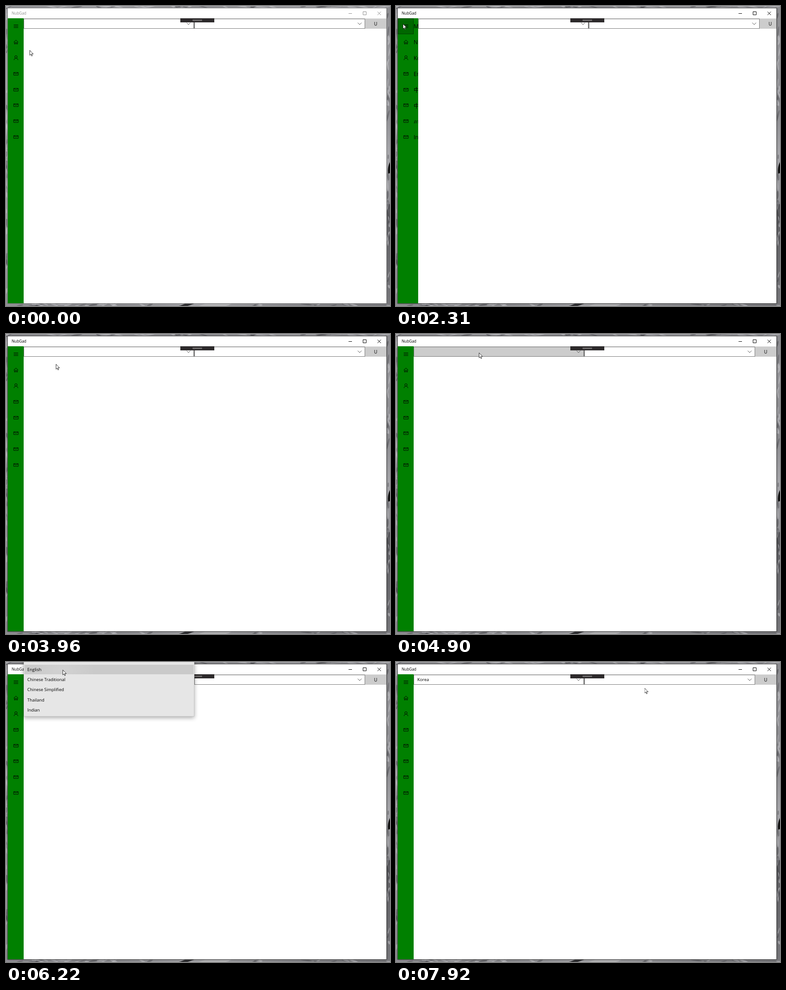
Animation, 848 px wide and 660 px high, one loop 8 s. Source, as an HTML page with a canvas:

```html
<!DOCTYPE html>
<html lang="en">
<head>
<meta charset="utf-8">
<title>NubGad</title>
<style>
@property --x { syntax: "<length>"; inherits: true; initial-value: 39px; }
@property --w { syntax: "<length>"; inherits: true; initial-value: 801px; }
html, body { margin: 0; width: 100%; height: 100%; overflow: hidden; background: #8c8c90; }
body { position: relative; font: 9.45px/22px "Open Sans", "Noto Sans", sans-serif; color: #000; }
body * { box-sizing: border-box; }
canvas, #win, #win > *, #popup, #cursor, .hl, .hov { position: absolute; }
canvas { left: 0; top: 0; }
svg { display: block; fill: none; stroke: currentColor; }
#win, #win *, #popup, .hl, #cursor { animation: 8s step-end infinite; }

#win { left: 0; top: 0; width: 848px; height: 660px; animation-name: pane; }
#frame { left: 3px; top: 4px; width: 838px; height: 651px; background: #fff; border: 1px solid #555; animation-name: shade !important; }
#bar { left: 4px; top: 5px; width: 836px; height: 22px; font-size: 8.4px; animation-name: active !important; }
#bar span { position: absolute; left: 8.5px; }
#bar svg { position: absolute; left: 750px; top: 4px; }

#side { left: 4px; top: 27px; width: calc(var(--x) - 4px); height: 627px; background: #008000; overflow: hidden; }
.hov { left: 0; top: 0; width: 35px; height: 35px; border: 1px solid #0006; animation-name: hover !important; }
.row { position: relative; height: 34.8px; font-size: 12.1px; line-height: 34.8px; white-space: nowrap; }
.row svg { position: absolute; left: 11.5px; top: 11.4px; width: 12px; height: 12px; stroke-width: .9; }
.row span { position: absolute; left: 35px; top: 1.2px; }
.cjk { font-size: 12.65px; }
[lang=zh-Hant] { font-family: "Open Sans", "Noto Sans CJK TC", sans-serif; }
[lang=zh-Hans] { font-family: "Open Sans", "Noto Sans CJK SC", sans-serif; }

#clip { left: 0; top: 27px; width: 840px; height: 23px; overflow: hidden; }
#page { position: absolute; left: var(--x); top: 1px; width: var(--w); height: 21px; display: grid; grid-template-columns: 8fr 8fr 1fr; animation-name: fade !important; }
.combo { position: relative; min-width: 0; border: 1px solid #7a7a7a; box-shadow: 0 1px #7a7a7a66, 0 -1px #7a7a7a55; line-height: 20px; padding-left: 7px; }
.combo svg { position: absolute; right: 6px; top: 7px; width: 10px; height: 6px; color: #555; }
#first { border-right-width: 2px; animation-name: press; }
#first span { animation-name: picked; }
#go { min-width: 0; background: #ccc; box-shadow: 0 -1px #ccc8, 0 1px #ccc8; text-align: center; line-height: 22px; font-size: 10px; }
#grip { left: 384.5px; top: 27px; width: 75.5px; height: 9px; background: #2d2a2b; }
#grip::after { content: ""; position: absolute; left: 27.5px; top: 3px; width: 21px; height: 3px; background: #6e6b6c; }

#popup { left: 39px; top: -23px; width: 377px; height: 143px; padding: 5.5px 0 0 7px; background: #e6e6e6; border: 1px solid #c6c6c6; box-shadow: 0 3px 9px #0005; animation-name: drop; }
#popup p { position: relative; margin: 0; height: 22.3px; line-height: 22.3px; }
.hl { left: 1px; width: 373px; height: 21.6px; background: radial-gradient(ellipse 70px 30px at 85px 12px, #d2d2d2, #cacaca); animation-name: pick; }
#cursor { left: 0; top: 0; width: 9px; height: 14px; fill: #fff; stroke: #000; stroke-width: .8; animation-name: move; }

@keyframes active { 0% { color: #8e8e8e; } 7.75% { color: #000; } }
@keyframes shade {
  0% { box-shadow: 0 0 2px #0003; border-color: #777; }
  7.75% { box-shadow: 0 0 4px #0006; border-color: #444; }
}
@keyframes pane {
  0% { --x: 39px; --w: 801px; }
  8.75% { --x: 84px; --w: 732px; }
  9.75% { --x: 102px; --w: 732px; }
  10.625% { --x: 106px; --w: 732px; }
  11.625% { --x: 108px; --w: 732px; }
  26.875% { --x: 96px; --w: 801px; }
  27.875% { --x: 66px; --w: 801px; }
  28.875% { --x: 49px; --w: 801px; }
  30.125% { --x: 42px; --w: 801px; }
  31% { --x: 40px; --w: 801px; }
  32%, 100% { --x: 39px; --w: 801px; }
}
@keyframes hover {
  0% { visibility: hidden; top: 0; background: #0002; }
  2.875% { visibility: visible; top: 0; background: #0002; }
  7.75% { visibility: visible; top: 0; background: #0003; }
  13.5% { visibility: visible; top: 0; background: #0002; }
  26% { visibility: visible; top: 0; background: #0003; }
  32.875% { visibility: visible; top: 0; background: #0002; }
  36.75% { visibility: visible; top: 35px; background: #0002; }
  41.625% { visibility: visible; top: 35px; background: #0003; }
  45.625% { visibility: visible; top: 35px; background: #0002; }
  46.6%, 100% { visibility: hidden; top: 35px; background: #0002; }
}
@keyframes fade {
  0% { opacity: 1; }
  43.625% { opacity: .4; }
  44.625% { opacity: .84; }
  45.625% { opacity: .95; }
  46.6%, 100% { opacity: 1; }
}
@keyframes press {
  0% { background: #fff; border-color: #7a7a7a; }
  49.6% { background: #fff; border-color: #666; }
  59.375% { background: #ccc; border-color: #7a7a7a; }
  86.375%, 100% { background: #fff; border-color: #7a7a7a; }
}
@keyframes picked { 0% { visibility: hidden; } 86.375%, 100% { visibility: visible; } }
@keyframes drop {
  0% { visibility: hidden; opacity: 1; clip-path: inset(50px -20px 71px); }
  62.375% { visibility: visible; opacity: 1; clip-path: inset(34px -20px 46px); }
  63.4% { visibility: visible; opacity: 1; clip-path: inset(12px -20px 15px); }
  64.4% { visibility: visible; opacity: 1; clip-path: inset(2px -20px 3px); }
  65.4% { visibility: visible; opacity: 1; clip-path: inset(-20px); }
  86.375% { visibility: visible; opacity: .5; clip-path: inset(-20px); }
  87.5%, 100% { visibility: hidden; opacity: 1; clip-path: inset(-20px); }
}
@keyframes pick {
  0% { top: 50.1px; }
  67.4% { top: 27.8px; }
  79.75%, 100% { top: 5.5px; }
}
@keyframes move {
  0% { transform: translate(52px, 97px); }
  .75% { transform: translate(0, 30px); }
  2.875% { transform: translate(6px, 32px); }
  3.875% { transform: translate(11px, 36px); }
  4.875% { transform: translate(14px, 38px); }
  5.875% { transform: translate(15px, 39px); }
  35.75% { transform: translate(21px, 58px); }
  36.75% { transform: translate(26px, 79px); }
  45.625% { transform: translate(31px, 84px); }
  46.6% { transform: translate(46px, 89px); }
  47.6% { transform: translate(76px, 80px); }
  48.6% { transform: translate(110px, 66px); }
  49.6% { transform: translate(138px, 55px); }
  50.5% { transform: translate(153px, 50px); }
  51.5% { transform: translate(160px, 48px); }
  55.375% { transform: translate(170px, 46px); }
  56.25% { transform: translate(180px, 43px); }
  57.25% { transform: translate(183px, 41px); }
  66.4% { transform: translate(172px, 36px); }
  67.4% { transform: translate(148px, 26px); }
  68.4% { transform: translate(130px, 22px); }
  69.125% { transform: translate(125px, 20px); }
  71.125% { transform: translate(125px, 17px); }
  78.75% { transform: translate(122px, 9px); }
  79.75% { transform: translate(118px, 0); }
  80.625% { transform: translate(113px, -8px); }
  89.375% { transform: translate(150px, 20px); }
  90.375% { transform: translate(236px, 78px); }
  91.25% { transform: translate(312px, 118px); }
  92.25% { transform: translate(341px, 131px); }
  95.125% { transform: translate(372px, 124px); }
  96.125% { transform: translate(440px, 103px); }
  97.125% { transform: translate(505px, 78px); }
  98% { transform: translate(538px, 64px); }
  99%, 100% { transform: translate(548.5px, 57px); }
}
</style>
</head>
<body>
<svg width="0" height="0" style="position:absolute">
  <symbol id="bars" viewBox="0 0 12 12"><path d="M1 3.5h10M1 6.5h10M1 9.5h10"/></symbol>
  <symbol id="home" viewBox="0 0 12 12"><path d="M1.2 6.4 6 1.9l4.8 4.5M2.6 5.4v5.1h2.3V7.2h2.2v3.3h2.3V5.4"/></symbol>
  <symbol id="user" viewBox="0 0 12 12"><circle cx="6" cy="4" r="2.7"/><path d="M1.7 11c.3-2.8 2-4.3 4.3-4.3s4 1.5 4.3 4.3"/></symbol>
  <symbol id="mail" viewBox="0 0 12 12"><path d="M1 3.2h10v6H1zM1 3.5l5 2.8 5-2.8"/></symbol>
  <symbol id="down" viewBox="0 0 10 6"><path d="M.7.7 5 5 9.3.7"/></symbol>
</svg>
<canvas id="wall" width="848" height="660"></canvas>

<div id="win">
  <div id="frame"></div>
  <div id="bar">
    <span>NubGad</span>
    <svg width="80" height="14"><path d="M2.5 7.5h7.5M34.5 3.5h7v7h-7zM66.5 3.5l7.5 7.5M74 3.5 66.5 11"/></svg>
  </div>
  <div id="clip">
    <div id="page">
      <div class="combo" id="first"><span>Korea</span><svg><use href="#down"/></svg></div>
      <div class="combo"><svg><use href="#down"/></svg></div>
      <div id="go">U</div>
    </div>
  </div>
  <div id="side">
    <div class="hov"></div>
    <div class="row"><svg><use href="#bars"/></svg><span>Menu</span></div>
    <div class="row"><svg><use href="#home"/></svg><span>NubGad</span></div>
    <div class="row"><svg><use href="#user"/></svg><span>Korean</span></div>
    <div class="row"><svg><use href="#mail"/></svg><span>English</span></div>
    <div class="row"><svg><use href="#mail"/></svg><span class="cjk" lang="zh-Hant">中文 (繁體)</span></div>
    <div class="row"><svg><use href="#mail"/></svg><span class="cjk" lang="zh-Hans">中文 (简体)</span></div>
    <div class="row"><svg><use href="#mail"/></svg><span lang="th">ภาษาไทย</span></div>
    <div class="row"><svg><use href="#mail"/></svg><span>Indonesia</span></div>
  </div>
  <div id="grip"></div>
</div>

<div id="popup">
  <div class="hl"></div>
  <p>Korea</p>
  <p>English</p>
  <p>Chinese Traditional</p>
  <p>Chinese Simplified</p>
  <p>Thailand</p>
  <p>Indian</p>
</div>
<svg id="cursor" viewBox="0 0 9 14"><path d="M.5.5v10.9l2.5-2.3 1.7 4 1.6-.7-1.7-3.9h3.6z"/></svg>

<script>
// Soft grey wallpaper that shows around the window
const g = document.getElementById('wall').getContext('2d');
let seed = 11;
const rnd = () => (seed = seed * 16807 % 2147483647) / 2147483647;

function blob(x, y, rx, ry, color) {
  g.fillStyle = color;
  g.beginPath();
  g.ellipse(x, y, rx, ry, rnd() - .5, 0, 7);
  g.fill();
}

function strip(x, y, w, h, stops) {
  const fill = g.createLinearGradient(x, y, w > h ? x + w : x, w > h ? y : y + h);
  stops.forEach((c, i) => fill.addColorStop(i / (stops.length - 1), c));
  g.fillStyle = fill;
  g.fillRect(x, y, w, h);
}

strip(0, 0, 848, 8, ['#929296', '#a2a2a6', '#909094', '#a0a0a4', '#99999d']);
strip(0, 0, 8, 660, ['#9a9a9e', '#a8a8ac', '#9c9ca0', '#a4a4a8', '#909094']);
strip(838, 0, 10, 436, ['#8c8c90', '#98989c', '#8a8a8e', '#a8a8ac', '#909094']);
strip(838, 436, 10, 224, ['#5c5c60', '#6a6a6e', '#77777b']);
strip(0, 652, 848, 8, ['#909094', '#88888c', '#a4a4a8', '#88888c', '#77777b']);

for (let i = 0; i < 34; i++) {
  const tone = rnd() < .5 ? '#44444866' : '#d0d0d477';
  blob(rnd() * 848, rnd() * 4, 5 + rnd() * 14, 1 + rnd(), tone);
  blob(rnd() * 848, 656 + rnd() * 4, 4 + rnd() * 11, 1 + rnd() * 1.5, tone);
  blob(rnd() * 4, rnd() * 660, 1 + rnd() * 2, 4 + rnd() * 12, tone);
  blob(842 + rnd() * 6, rnd() * 660, 1 + rnd() * 2, 4 + rnd() * 10, tone);
}
blob(848, 355, 4, 14, '#111');
blob(450, 662, 90, 10, '#b4b4b6');
blob(400, 657, 28, 3, '#333336');
</script>
</body>
</html>
```
